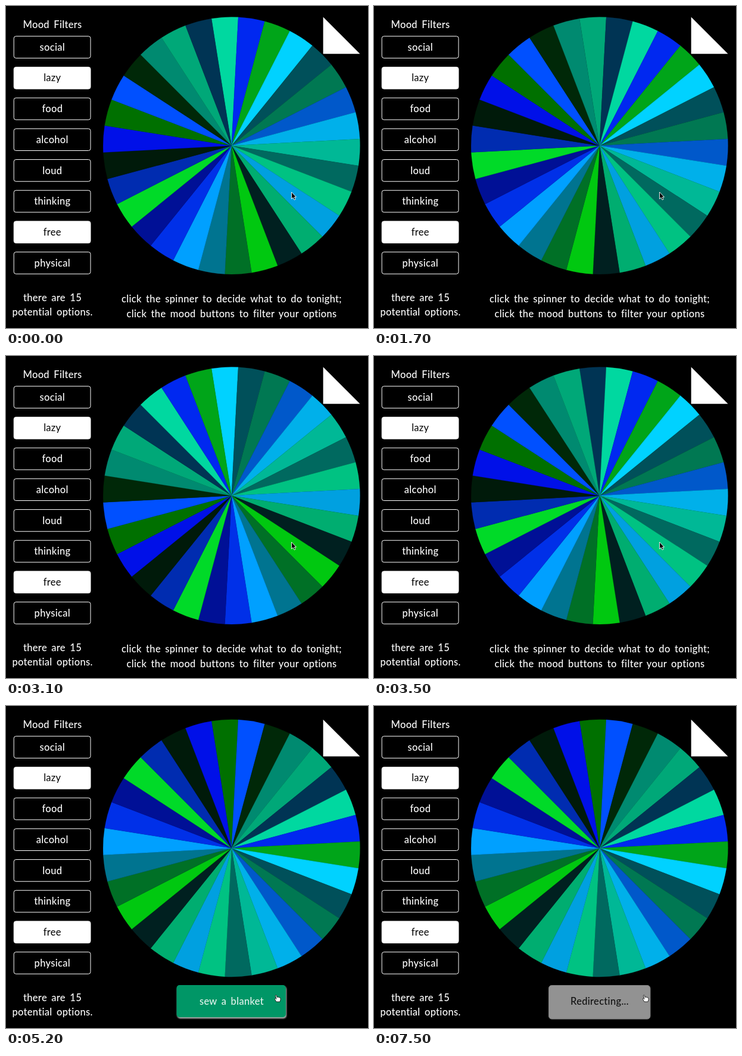
Recreate the animation shown at these times as an HTML page. Size 608x540 px, loop 7.6 s.

```html
<!DOCTYPE html>
<html lang="en">
<head>
<meta charset="utf-8">
<title>Mood spinner</title>
<style>
html, body { margin: 0; width: 100%; height: 100%; overflow: hidden; background: #000; }
svg { display: block; width: 608px; height: 540px; }
text {
  font: 500 16.5px Lato, "Open Sans", sans-serif;
  letter-spacing: .3px;
  word-spacing: 2.9px;
  text-anchor: middle;
  fill: #fff;
}
.filter rect { fill: #000; stroke: #fff; }
.filter.on rect { fill: #fff; }
.filter.on text { fill: #000; font-weight: 400; }
#choice rect { fill: #009666; filter: drop-shadow(1px 2px 1px #bbb); }
#choice text { fill: #e4f4ee; }
#redirect rect { fill: #929292; stroke: #7c7c7c; }
#redirect text { fill: #111; }
</style>
</head>
<body>
<svg id="stage" viewBox="0 0 608 540">
  <rect width="608" height="540"/>
  <text x="78" y="37">Mood Filters</text>
  <g id="filters"></g>
  <text x="78" y="494.5">there are 15</text>
  <text x="78" y="518.5">potential options.</text>
  <g id="spinner">
    <g id="wheel"></g>
    <path d="M532.7 18.5V80.3H594.5Z" fill="#fff"/>
  </g>
  <g id="hint">
    <text x="379" y="497">click the spinner to decide what to do tonight;</text>
    <text x="379" y="521.500">click the mood buttons to filter your options</text>
  </g>
  <g id="choice">
    <rect x="286.5" y="468" width="183.5" height="54" rx="5"/>
    <text x="379" y="501">sew a blanket</text>
  </g>
  <g id="redirect">
    <rect x="293.5" y="468.5" width="170.5" height="56.5" rx="5"/>
    <text x="379" y="501">Redirecting...</text>
  </g>
  <path id="arrow" d="M0 0V11.5L2.6 9.2 4.5 13.2 6.6 12.2 4.8 8.4H8Z" fill="#000" stroke="#fff" stroke-width=".9"/>
  <path id="hand" d="M-1 7C-2 5-4 2.5-3.5 1.5S-1.7 1.5-1 2.5L-2.5-3C-2.7-4.6-1-4.8-.6-3.4L.3-.4C1-1.3 2-1.2 2.3-.3 3-.9 4-.7 4.2.2 5-.2 5.7.2 5.9 1 6.4 3 6 4.5 5 7Z" fill="#fff" stroke="#000" stroke-width=".8"/>
</svg>
<script>
const LOOP = 7600, REVEAL = 4200, REDIRECT = 6100;
const SLICES = 30, STEP = 12;
const CX = 378.8, CY = 234.2, R = 215.7;
const COLORS = ("00d8a0 0028f0 00a519 00d2ff 00505a 007852 0058ca 00b0ea 00b896 00695f " +
  "00c282 00a0e0 00ad70 002020 00c810 007026 007490 00a0ff 0030e8 001096 " +
  "00da28 002cb0 001a0a 0010e8 007000 0050ff 002808 008a70 00a878 003454").split(" ");

const byId = id => document.getElementById(id);

function add(parent, name, attrs) {
  const el = document.createElementNS("http://www.w3.org/2000/svg", name);
  for (const key in attrs) el.setAttribute(key, attrs[key]);
  return parent.appendChild(el);
}

["social", "lazy", "food", "alcohol", "loud", "thinking", "free", "physical"].forEach((label, i) => {
  const on = label === "lazy" || label === "free";
  const y = 50.7 + i * 51.7;
  const g = add(byId("filters"), "g", { class: on ? "filter on" : "filter" });
  add(g, "rect", { x: 13.2, y, width: 128.8, height: 36.7, rx: 3.5 });
  add(g, "text", { x: 77.8, y: y + 24 }).textContent = label;
});

function rim(deg) {
  const a = deg * Math.PI / 180;
  return (CX + R * Math.sin(a)).toFixed(2) + " " + (CY - R * Math.cos(a)).toFixed(2);
}

const wedges = COLORS.map((_, i) => {
  const start = i * STEP - 9;
  return add(byId("wheel"), "path", {
    d: `M${CX} ${CY}L${rim(start)}A${R} ${R} 0 0 1 ${rim(start + STEP)}Z`,
    "stroke-width": .3
  });
});

// The wheel jumps slice by slice; each wait is GROWTH times the one before.
const SPIN_START = 1050, FIRST_WAIT = 10.49, GROWTH = 1.038, JUMPS = 66;

function jumpsAt(t) {
  const elapsed = Math.max(0, t - SPIN_START);
  const n = Math.log(1 + elapsed * (GROWTH - 1) / FIRST_WAIT) / Math.log(GROWTH);
  return Math.min(JUMPS, Math.floor(n));
}

function show(id, visible) {
  byId(id).style.display = visible ? "" : "none";
}

function place(id, x, y) {
  byId(id).setAttribute("transform", `translate(${x} ${y})`);
}

function draw(t) {
  const turned = jumpsAt(t) % SLICES;
  wedges.forEach((w, i) => {
    const color = "#" + COLORS[(i - turned + SLICES) % SLICES];
    w.setAttribute("fill", color);
    w.setAttribute("stroke", color);
  });

  const revealed = t >= REVEAL, redirecting = t >= REDIRECT;
  place("spinner", 0, revealed ? 4.3 : 0);
  show("hint", !revealed);
  show("choice", revealed && !redirecting);
  show("redirect", redirecting);

  const p = Math.min(1, Math.max(0, (t - 4500) / 600));
  const ease = p * p * (3 - 2 * p);
  const x = 479.5 - 24.5 * ease, y = 312 + 177 * ease;
  const over = y > 468;
  show("arrow", !over);
  show("hand", over);
  place("arrow", x, y);
  place("hand", x, y);
}

function tick() {
  const t = performance.now() % LOOP;
  draw(Math.floor(t / 100) * 100);
  requestAnimationFrame(tick);
}
tick();
</script>
</body>
</html>
```
